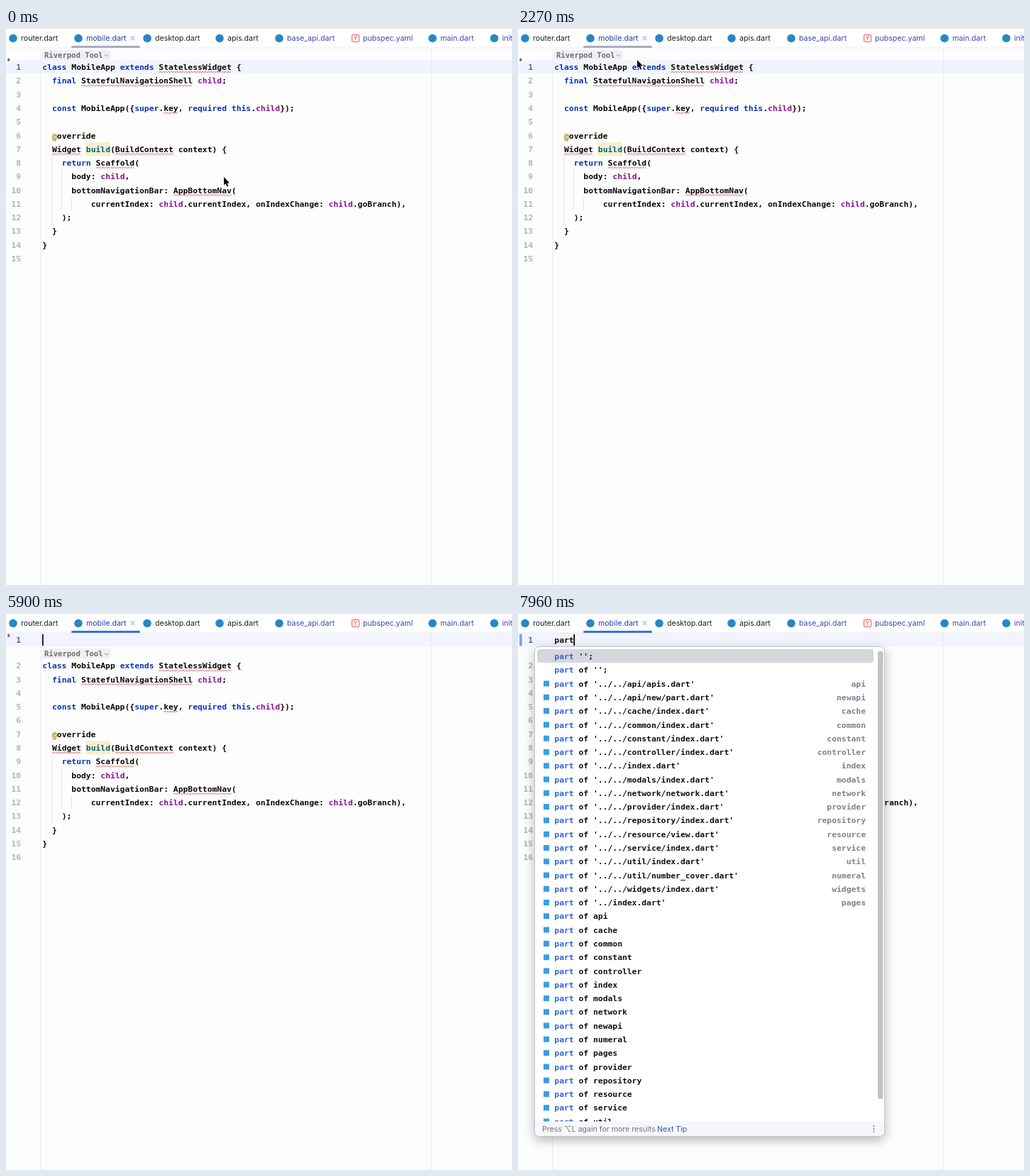
Write an HTML page with a canvas that moves like this. It is 713 by 785 pixels and loops after 8 s.

```html
<!DOCTYPE html>
<html lang="en">
<head>
<meta charset="utf-8">
<title>Code completion</title>
<style>
  html, body { margin: 0; width: 713px; height: 785px; overflow: hidden; background: #fdfdfd; }
  canvas { display: block; }
</style>
</head>
<body>
<canvas id="stage" width="713" height="785"></canvas>
<script>
const ctx = document.getElementById('stage').getContext('2d');
const LOOP = 8000, W = 713, H = 785;
const CHAR = 6.835, ROW = 19.28, LEFT = 51.3;
const MONO = '700 11.35px "DejaVu Sans Mono", monospace';
const HINT = '700 10.55px "DejaVu Sans Mono", monospace';
const UI = '400 10.58px Inter, "DejaVu Sans", sans-serif';

// Moments of the story, in ms
const FOCUS = 4580, CARET_OFF = 5080, POINTER_OFF = 5250, ENTER = 5520, MARKED = 6130;
const KEYS = [6580, 6760, 7050, 7440], POPUP = 6700, FULL_LIST = 7250;

// Pointer stops: time, x, y
const PATH = [[0, 307, 210], [800, 84, 83], [1000, 84, 83], [2270, 168, 45],
              [4270, 168, 45], [4700, 171.5, 41], [LOOP, 171.5, 41]];

const CODE = `class MobileApp extends StatelessWidget {
  final StatefulNavigationShell child;

  const MobileApp({super.key, required this.child});

  @override
  Widget build(BuildContext context) {
    return Scaffold(
      body: child,
      bottomNavigationBar: AppBottomNav(
          currentIndex: child.currentIndex, onIndexChange: child.goBranch),
    );
  }
}
`.split('\n');

const KEYWORDS = /^(class|extends|final|const|super|required|this|return)$/;
const ERRORS = /^(StatelessWidget|StatefulNavigationShell|key|@|Widget|BuildContext|Scaffold|AppBottomNav)$/;

// Tab: icon centre, label x, label, colour
const DARK = '#1c1d22', CHANGED = '#3b46b8';
const TABS = [
  [10, 21, 'router.dart', DARK], [102, 113, 'mobile.dart', '#1f3fae'],
  [199, 210, 'desktop.dart', DARK], [301, 312, 'apis.dart', DARK],
  [385, 396, 'base_api.dart', CHANGED], [492, 503, 'pubspec.yaml', CHANGED],
  [601, 612, 'main.dart', CHANGED], [688, 699, 'init.dart', CHANGED]
];

const PATHS = `../../api/apis api|../../api/new/part newapi|../../cache/index cache
../../common/index common|../../constant/index constant|../../controller/index controller
../../index index|../../modals/index modals|../../network/network network
../../provider/index provider|../../repository/index repository|../../resource/view resource
../../service/index service|../../util/index util|../../util/number_cover numeral
../../widgets/index widgets|../index pages`.split(/[|\n]/).map(s => s.split(' '));
const LIBRARIES = PATHS.map(p => p[1]).filter(name => name !== 'widgets').sort();
const BASICS = [["part '';"], ["part of '';"]];
const SUGGESTIONS = [
  ...BASICS,
  ...PATHS.map(([path, name]) => [`part of '${path}.dart'`, name]),
  ...LIBRARIES.map(name => [`part of ${name}`])
];

function text(str, x, y, color, font = MONO, align = 'left') {
  ctx.font = font;
  ctx.fillStyle = color;
  ctx.textAlign = align;
  ctx.fillText(str, x, y);
}

function rect(x, y, w, h, color, radius = 0) {
  ctx.fillStyle = color;
  ctx.beginPath();
  ctx.roundRect(x, y, w, h, radius);
  ctx.fill();
}

function dot(x, y, r, color) {
  ctx.fillStyle = color;
  ctx.beginPath();
  ctx.arc(x, y, r, 0, 7);
  ctx.fill();
}

function line(points, color, width = 1, close = false) {
  ctx.strokeStyle = color;
  ctx.lineWidth = width;
  ctx.beginPath();
  points.forEach(([x, y]) => ctx.lineTo(x, y));
  if (close) ctx.closePath();
  ctx.stroke();
}

function squiggle(x, y, width) {
  const points = [];
  for (let i = 0; i <= width / 2; i++) points.push([x + i * 2, y + (i % 2 ? -1 : 1)]);
  line(points, '#e5504d', 0.9);
}

function tabs(focused) {
  rect(0, 0, W, 28, '#fff');
  rect(0, 0, W, 1, '#e4e5ea');
  rect(0, 27.5, W, 1, '#ebecf2');
  for (const [icon, x, label, color] of TABS) {
    if (label.endsWith('yaml')) {
      rect(487.5, 9.5, 10, 10, '#fff3f3', 1.5);
      ctx.strokeStyle = '#e2606c';
      ctx.lineWidth = 1;
      ctx.stroke();
      text('Y', 492.5, 17.3, '#dc4b5a', '400 8px Inter, sans-serif', 'center');
    } else dot(icon, 14.5, 5.8, '#2587c8');
    text(label, x, 18.3, color, UI);
  }
  line([[175.5, 11.5], [181.5, 17.5]], '#8f94b0');
  line([[181.5, 11.5], [175.5, 17.5]], '#8f94b0');
  rect(92, 25, 97, 3, focused ? '#3871e6' : '#a9adbd', 1.5);
}

function codeLine(str, y) {
  let col = 0;
  for (const token of str.match(/\w+|@|[^\w@]+/g) || []) {
    const x = LEFT + col * CHAR, width = token.length * CHAR;
    let color = '#080808';
    if (KEYWORDS.test(token)) color = '#0a33b0';
    else if (token === 'child') color = '#871094';
    else if (token === '@') color = '#9e880d';
    else if (token === 'build') {
      color = '#00627a';
      rect(x - 0.5, y - 9.6, width + 0.5, ROW, '#faefcb');
    }
    // Each word sits on the character grid
    token.replace(/\S+/g, (word, at) => text(word, x + at * CHAR, y + 4.1, color));
    if (ERRORS.test(token)) squiggle(x, y + 7, width);
    col += token.length;
  }
}

function hint(y) {
  rect(51, y - 7, 97, 14, '#f0f0f1', 3);
  text('Riverpod Tool', 54, y + 3.8, '#6d6e73', HINT);
  line([[139, y - 0.5], [141.5, y + 2], [144, y - 0.5]], '#85868c');
}

function editor(t, typed) {
  const inserted = t >= ENTER;
  const currentY = inserted ? 38 : 55;
  const codeY = i => (inserted ? 74.2 : 55) + i * ROW;
  rect(0, currentY - 9.5, W, 19, '#f1f4fe');
  rect(48.5, 28, 1, H, '#e6e7f5');
  rect(598.5, 28, 1, H, '#e6e7f5');

  // Indent guides: column, first line, line count
  for (const [col, first, count] of [[2, 7, 5], [4, 8, 3], [6, 10, 1]])
    rect(LEFT + col * CHAR - 0.5, codeY(first) - 9.6, 1, count * ROW, '#e3e4ea');

  hint(inserted ? 57.3 : 37.8);
  CODE.forEach((str, i) => {
    codeLine(str, codeY(i));
    const current = !inserted && i === 0;
    text(i + (inserted ? 2 : 1), 21.2, codeY(i) + 4.1, current ? '#5f6475' : '#aeb3c2', MONO, 'right');
  });
  if (inserted) {
    text('1', 21.2, 42.1, '#5f6475', MONO, 'right');
    text(typed, LEFT, 42.1, '#080808');
  }

  if (t >= MARKED) rect(2, 29.5, 3.8, 17, '#7ba4f4', 1.5);
  else rect(2.2, inserted ? 29.5 : 42.5, 3.2, 4.6, '#74767e', 1.6);

  const caret = t >= FOCUS && t < CARET_OFF || t >= ENTER && t < MARKED || t >= KEYS[0];
  if (caret) rect(LEFT + typed.length * CHAR - 0.3, currentY - 8, 1.7, 16, '#000');
}

function popup(typed, full) {
  const bottom = full ? 737.5 : 110, footer = bottom - (full ? 21 : 19);
  const middle = full ? 727 : 100;
  ctx.save();
  ctx.shadowColor = 'rgba(0,0,0,.3)';
  ctx.shadowBlur = 16;
  ctx.shadowOffsetY = 5;
  rect(23.5, 47.5, 493, bottom - 47.5, '#fff', 6);
  ctx.restore();

  ctx.save();
  ctx.beginPath();
  ctx.roundRect(23.5, 47.5, 493, bottom - 47.5, 6);
  ctx.clip();
  rect(27, 51, full ? 474 : 486.5, 19, '#d5d7dc', 3);
  (full ? SUGGESTIONS : BASICS).forEach(([label, library], i) => {
    const y = 61 + i * ROW;
    text(typed, LEFT, y + 4.1, '#2c61d8');
    label.replace(/\S+/g, (word, at) => {
      const skip = at ? 0 : typed.length;
      text(word.slice(skip), LEFT + (at + skip) * CHAR, y + 4.1, '#101114');
    });
    if (i > 1) rect(36, y - 4, 8, 8, '#3a9fe2');
    if (library) text(library, 490, y + 4.1, '#7d818e', MONO, 'right');
  });
  if (full) rect(507, 54, 7.5, 631, '#c2c3c6', 3);
  rect(23, footer, 494, bottom - footer, '#f6f7fa');
  text(full ? 'Press ⌥L again for more results'
            : 'Press ^. to choose the selected (or first) suggestion and insert a dot afterwards',
       34, middle + 3.7, '#6f7380', UI);
  text('Next Tip', full ? 196 : 433.5, middle + 3.7, '#2f55c0', UI);
  for (const dy of [-4, 0, 4]) dot(501.3, middle + dy, 0.9, '#6c707e');
  ctx.restore();

  ctx.strokeStyle = '#c3c6cf';
  ctx.lineWidth = 1;
  ctx.beginPath();
  ctx.roundRect(23.5, 47.5, 493, bottom - 47.5, 6);
  ctx.stroke();
}

function pointer(t) {
  const next = PATH.findIndex(stop => stop[0] > t);
  const [t0, x0, y0] = PATH[next - 1], [t1, x1, y1] = PATH[next];
  const u = (t - t0) / (t1 - t0), ease = u * u * (3 - 2 * u);
  ctx.save();
  ctx.translate(x0 + (x1 - x0) * ease, y0 + (y1 - y0) * ease);
  if (t < FOCUS) {
    const arrow = [[0, 0], [0, 11.5], [2.6, 9.2], [4.4, 13.5], [6.3, 12.7], [4.5, 8.6], [8, 8.6]];
    line(arrow, '#fff', 1.8, true);
    ctx.fillStyle = '#000';
    ctx.fill();
  } else {
    for (const [color, width] of [['#fff', 2.6], ['#111', 1.2]]) {
      line([[-2.8, -5.8], [-0.9, -5.8], [0, -5], [0.9, -5.8], [2.8, -5.8]], color, width);
      line([[0, -5], [0, 5]], color, width);
      line([[-2.8, 5.8], [-0.9, 5.8], [0, 5], [0.9, 5.8], [2.8, 5.8]], color, width);
    }
  }
  ctx.restore();
}

function draw() {
  const t = performance.now() % LOOP;
  const typed = 'part'.slice(0, KEYS.filter(key => t >= key).length);
  rect(0, 0, W, H, '#fdfdfd');
  editor(t, typed);
  tabs(t >= FOCUS);
  if (t >= POPUP) popup(typed, t >= FULL_LIST);
  if (t < POINTER_OFF) pointer(t);
  requestAnimationFrame(draw);
}
draw();
</script>
</body>
</html>
```
